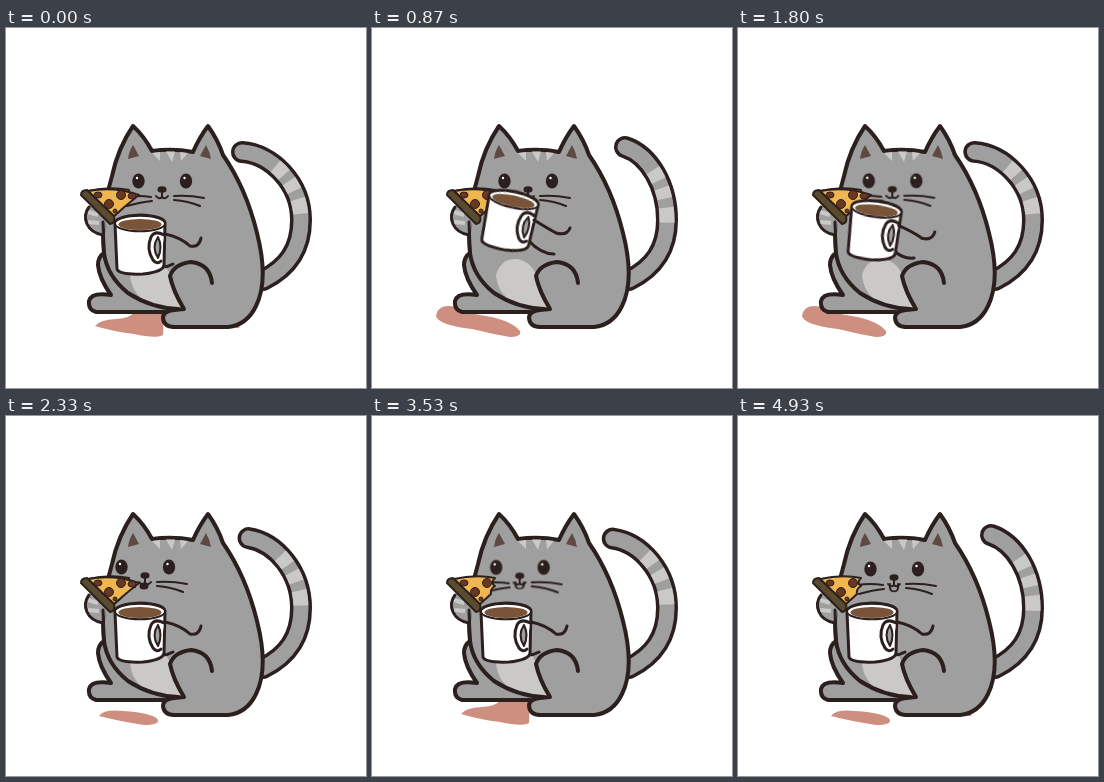
Write an HTML page that moves like this. It is 360x360 px and loops after 5 s.

```html
<!DOCTYPE html>
<html lang="en">
<head>
<meta charset="utf-8">
<title>Snacking cat</title>
<style>
html, body { margin: 0; width: 100%; height: 100%; overflow: hidden; background: #fff; }
svg { display: block; width: 100vw; height: 100vh; }

:root {
  --ink: #2b201e;
  --fur: #a09fa0;
  --pale: #cbc9c8;
  --tail-in: path("M236 124 C265 126 295 155 295 192 C295 222 281 240 257 252");
  --tail-out: path("M253 119 C277 127 295 157 295 192 C295 222 281 240 257 252");
  --puddle: path("M90 299 Q94 293 112 295 Q143 297 147 304 Q147 309 132 309 Q108 304 90 299");
  --puddle-right: path("M93 300 Q98 293 117 295 Q148 297 152 304 Q153 309 138 309 Q112 305 93 300");
  --spread: path("M64 288 Q66 275 84 279 Q96 285 108 287 Q138 291 148 303 Q150 309 138 309 Q120 306 100 301 Q66 297 64 288");
  --wide: path("M89 298 Q93 292 110 291 Q125 290 128 284 L156 284 Q158 300 157 307 Q150 311 128 306 Q105 303 89 298");
  --waist: path("M86 299 Q90 293 110 291 Q122 290 124 284 L136 284 Q136 290 150 293 Q157 298 153 307 Q144 311 126 306 Q106 302 86 299");
}
.line { fill: none; stroke: var(--ink); stroke-width: 4; stroke-linecap: round; stroke-linejoin: round; }
.thin { stroke-width: 2; }
.medium { stroke-width: 3; }
.fur { fill: var(--fur); }
.white { fill: #fff; }
.pale { fill: var(--pale); }
.ink { fill: var(--ink); }

[class*="go-"] { animation: 5s linear infinite; }
.go-tail { animation-name: tail; animation-timing-function: ease-in-out; }
.go-shadow { animation-name: shadow; animation-timing-function: step-end; }
.go-spot { animation-name: spot; animation-timing-function: step-end; }
.go-face { animation-name: face; animation-timing-function: ease-in-out; }
.go-mug { animation-name: mug; animation-timing-function: ease-in-out; transform-origin: 134px 218px; }
.go-arm { animation-name: arm; animation-timing-function: ease-in-out; }
.go-hand { animation-name: hand; animation-timing-function: ease-in-out; }
.go-tip { animation-name: tip; animation-timing-function: step-end; }
.go-bite { animation-name: bite; animation-timing-function: step-end; }
.go-chew { animation-name: chew; animation-timing-function: step-end; }
.go-jaw { animation: jaw .2s ease-in-out infinite alternate; transform-origin: 156px 168px; }

@keyframes tail {
  0%, 38%, 78% { d: var(--tail-in); }
  18%, 58%, 98%, 100% { d: var(--tail-out); }
}
@keyframes shadow {
  0%, 58.6%, 70% { d: var(--wide); }
  2.6%, 6.6%, 18%, 29.3%, 40%, 62%, 85%, 94% { d: var(--puddle); }
  4%, 14.6%, 25.3%, 36%, 50.6%, 89.3% { d: var(--spread); }
  45%, 53.3%, 97% { d: var(--puddle-right); }
  81%, 100% { d: var(--waist); }
}
@keyframes spot { 0%, 97.3%, 100% { opacity: 1; } 2.6% { opacity: 0; } }
@keyframes face {
  0%, 34%, 76%, 100% { transform: none; }
  43%, 52% { transform: translate(-17px, -2px); }
  56%, 66% { transform: translate(-15px, -3px); }
}
@keyframes mug {
  0%, 41%, 100% { transform: none; }
  9%, 32% { transform: translate(3px, -24px) rotate(12deg); }
}
@keyframes arm {
  0%, 41%, 100% { d: path("M159 206 Q174 209 184 218 Q193 220 195 210"); }
  9%, 32% { d: path("M162 192 Q175 200 184 205 Q195 208 198 200"); }
}
@keyframes hand {
  0%, 41%, 100% { d: path("M156 239 Q162 239 167 236"); }
  9%, 32% { d: path("M157 213 Q169 226 182 226"); }
}
@keyframes tip { 0% { opacity: 1; } 51%, 100% { opacity: 0; } }
@keyframes bite { 0%, 51%, 100% { opacity: 0; } 42% { opacity: 1; } }
@keyframes chew { 0% { opacity: 0; } 51%, 100% { opacity: 1; } }
@keyframes jaw { from { transform: scaleY(.75); } to { transform: scaleY(1); } }
</style>
</head>
<body>
<svg viewBox="0 0 360 360">
  <path class="go-shadow" fill="#cf8f80"/>
  <path class="go-spot" fill="#cf8f80" d="M222 294 L236 294 L233 300 L222 300Z"/>

  <g fill="none" stroke-linecap="round">
    <path class="go-tail" stroke="var(--ink)" stroke-width="22"/>
    <path class="go-tail" stroke="var(--fur)" stroke-width="15"/>
    <path class="go-tail" stroke="var(--pale)" stroke-width="15" stroke-linecap="butt" stroke-dasharray="0 37 12 8 11 9 15 300"/>
  </g>

  <!-- body -->
  <path class="line fur" d="M90 284 Q82 282 83 273 Q85 264 105 267 Q93 250 92 237 Q92 229 98 225 Q94 188 106 148 Q112 120 127 98 Q138 108 146 123 Q167 120 187 124 Q193 110 202 98 Q212 112 217 127 Q240 160 251 205 Q263 252 250 278 Q241 297 222 299 L168 299 Q160 297 158 284Z"/>
  <path class="pale" d="M124 247 Q129 230 145 231 Q159 233 166 250 L177 280 Q160 281 145 276 Q126 268 124 247"/>
  <path class="line" d="M98 225 Q101 248 122 265 Q145 280 172 281"/>
  <path class="fur" d="M206 257 Q206 236 185 234 Q166 237 164 247 Q166 262 178 281 L168 282 Q157 283 157 290 Q158 299 168 297 H212Z"/>
  <path class="line" d="M206 255 Q204 236 185 234 Q168 236 164 248 Q167 263 178 281 L168 282 Q157 283 157 290 Q158 299 168 299"/>

  <!-- ears and forehead -->
  <path fill="#5e4a42" d="M122 131 Q123 123 127 117 L133 128Z M194 128 L200 117 Q204 124 205 131Z"/>
  <path class="pale" d="M146 125 L154 124 L154 133Z M160 123.500 H169 L166 134Z M174 124 L182 125 L175 133Z"/>

  <!-- face -->
  <g class="go-face">
    <ellipse class="ink" cx="132.500" cy="153" rx="6.200" ry="7.500"/>
    <ellipse class="ink" cx="180" cy="153" rx="6.200" ry="7.500"/>
    <circle class="white" cx="131" cy="150" r="1.200"/>
    <circle class="white" cx="178.500" cy="150" r="1.200"/>
    <ellipse class="ink" cx="156" cy="161.500" rx="4.500" ry="3.200"/>
    <path class="line thin" d="M168 168 Q183 167 198 170 M168 172 Q182 173 194 178 M145 169 Q133 167 119 169 M146 173 Q135 174 121 178"/>
    <g class="go-chew"><path class="line thin go-jaw" d="M152 168 Q151 176 156 176 Q161 176 160 168"/></g>
    <path class="line thin" d="M156 163 V169 M150 168 Q153 172 156 169 Q159 172 162 168"/>
    <ellipse class="go-bite ink" cx="155" cy="172" rx="4.500" ry="3.500"/>
  </g>

  <!-- paw -->
  <path class="fur" d="M86 176 Q78 181 79 191 Q81 204 97 207 L101 190Z"/>
  <path fill="none" stroke="var(--pale)" stroke-width="4" d="M82 184 L92 187 M82 194 L93 195"/>
  <path class="line medium" d="M83 179 Q77 187 81 196 Q85 205 97 207 M97 194 L98 224"/>

  <!-- pizza -->
  <g stroke="var(--ink)" stroke-width="2" stroke-linejoin="round">
    <path fill="#f0b64f" d="M82 163 Q104 158 123 162 Q118 167 123 170 Q118 173 119 178 L107 189Z"/>
    <path class="go-tip" fill="#f0b64f" d="M82 163 Q108 158 133 167 Q119 178 107 189Z"/>
    <path fill="#5a4a2e" d="M75 167 Q75 162 81 162 L108 188 Q110 195 104 196Z"/>
  </g>
  <g fill="#6a3820" stroke="var(--ink)">
    <ellipse cx="92" cy="167" rx="4" ry="3"/>
    <circle cx="115" cy="167" r="4.500"/>
    <circle cx="103" cy="176" r="4.500"/>
    <circle cx="109" cy="183" r="2"/>
    <ellipse class="go-tip" cx="126" cy="168" rx="4" ry="3"/>
  </g>

  <!-- mug -->
  <path class="line medium go-hand"/>
  <g class="go-mug">
    <path class="line medium white" d="M109 196 Q109 188 134 187 Q158 188 159 195 L158 237 Q157 244 137 246 Q113 247 111 241Z"/>
    <ellipse class="line thin white" cx="134" cy="195.500" rx="25" ry="7.800"/>
    <ellipse fill="#795438" cx="134" cy="196.500" rx="21.500" ry="5.600"/>
    <path class="line medium white" d="M158 207 Q149 202 145 209 Q140 221 147 232 Q151 237 155 233"/>
    <path class="line thin fur" d="M152 209 Q145 219 152 230 Q157 219 152 209"/>
  </g>
  <path class="line medium go-arm"/>
</svg>
<script>
const FPS = 15, LOOP = 5000;
const moves = document.getAnimations();
moves.forEach(m => m.pause());

// Hold every pose for one step of the 15 fps rhythm.
function draw() {
  const t = (performance.now() + 5) % LOOP;
  const held = Math.floor(t * FPS / 1000) * 1000 / FPS;
  moves.forEach(m => { m.currentTime = held; });
  requestAnimationFrame(draw);
}
draw();
</script>
</body>
</html>
```
